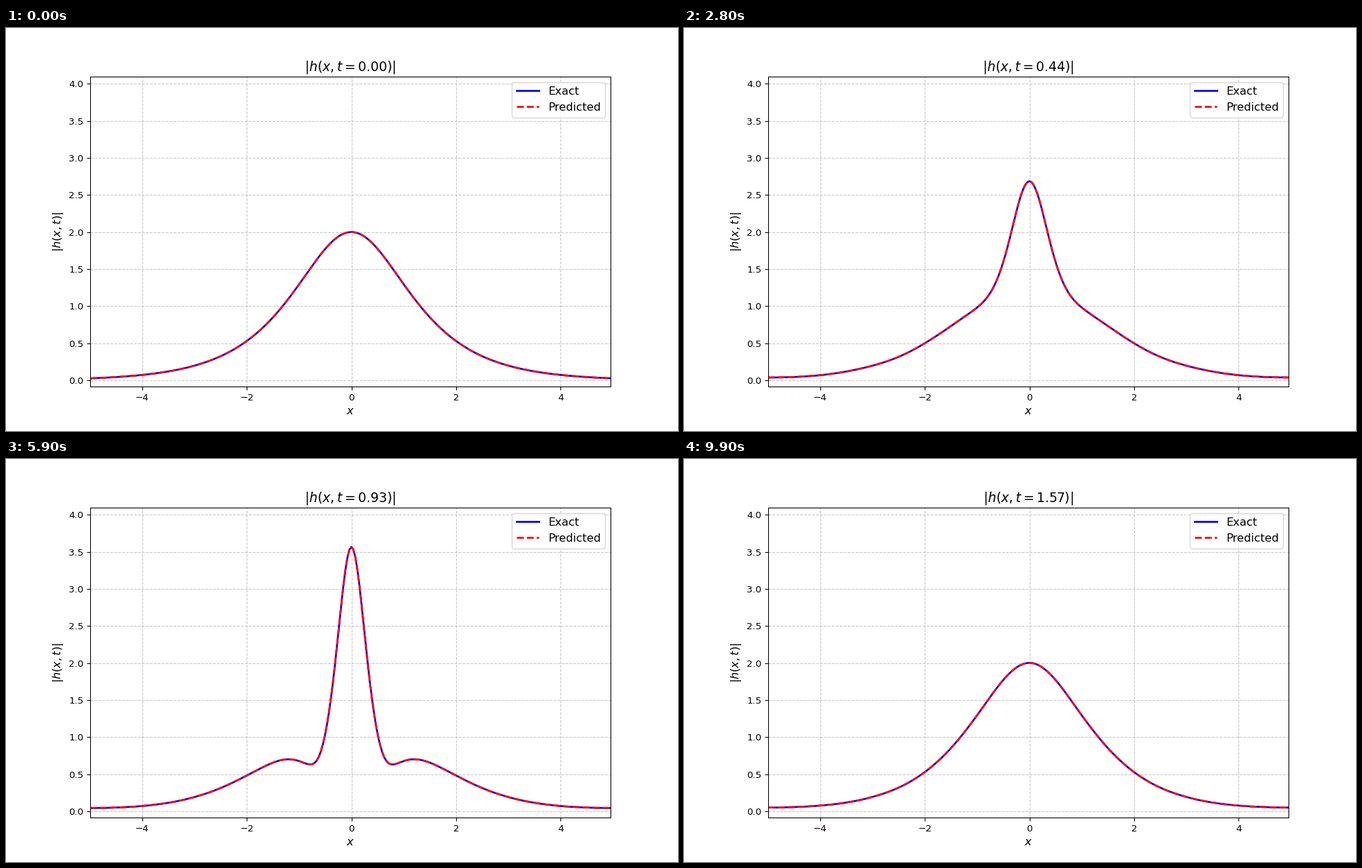
These frames come from a looping animation (966 px wide and 580 px high, 10 s). A matplotlib script:

```python
import numpy as np
import matplotlib.pyplot as plt
from matplotlib.animation import FuncAnimation

plt.rcParams["font.family"] = "DejaVu Sans"

FRAMES = 100
INTERVAL = 100
STEPS = 200      # stored time steps over [0, pi/2]
SUBSTEPS = 20    # solver steps between stored ones
N = 256
DPI = 96.6


def solve():
    """Periodic i h_t + h_xx / 2 + |h|^2 h = 0 by split-step Fourier."""
    x = np.linspace(-5, 5, N + 1)[:-1]
    t = np.linspace(0, np.pi / 2, STEPS + 1)
    dt = t[1] / SUBSTEPS
    k = 2 * np.pi * np.fft.fftfreq(N, 10 / N)
    half = np.exp(-0.25j * k**2 * dt)
    h = 2 / np.cosh(x) + 0j
    rows = [np.abs(h)]
    for _ in range(STEPS):
        for _ in range(SUBSTEPS):
            h = np.fft.ifft(half * np.fft.fft(h))
            h *= np.exp(1j * np.abs(h)**2 * dt)
            h = np.fft.ifft(half * np.fft.fft(h))
        rows.append(np.abs(h))
    return x, t, np.array(rows)


x, t, amp = solve()
picks = np.linspace(0, STEPS, FRAMES).astype(int)

# The small margin keeps the pixel size from rounding down.
fig, ax = plt.subplots(figsize=(966.01 / DPI, 580.01 / DPI), dpi=DPI)
exact, = ax.plot(x, amp[0], "b-", lw=2, label="Exact")
predicted, = ax.plot(x, amp[0], "r--", lw=2, label="Predicted")
title = ax.set_title("", fontsize=14)
ax.set_xlim(x[0], x[-1])
ax.set_ylim(-0.085, 4.1)
ax.set_xlabel("$x$", fontsize=12)
ax.set_ylabel("$|h(x,t)|$", fontsize=12)
ax.grid(True, linestyle="--", alpha=0.7)
ax.legend(loc="upper right", fontsize=12)


def update(frame):
    i = picks[frame]
    exact.set_ydata(amp[i])
    predicted.set_ydata(amp[i])
    title.set_text(f"$|h(x, t = {t[i]:.2f})|$")
    return exact, predicted, title


anim = FuncAnimation(fig, update, frames=FRAMES, interval=INTERVAL,
                     repeat=True, repeat_delay=0, blit=False)
plt.show()
```
